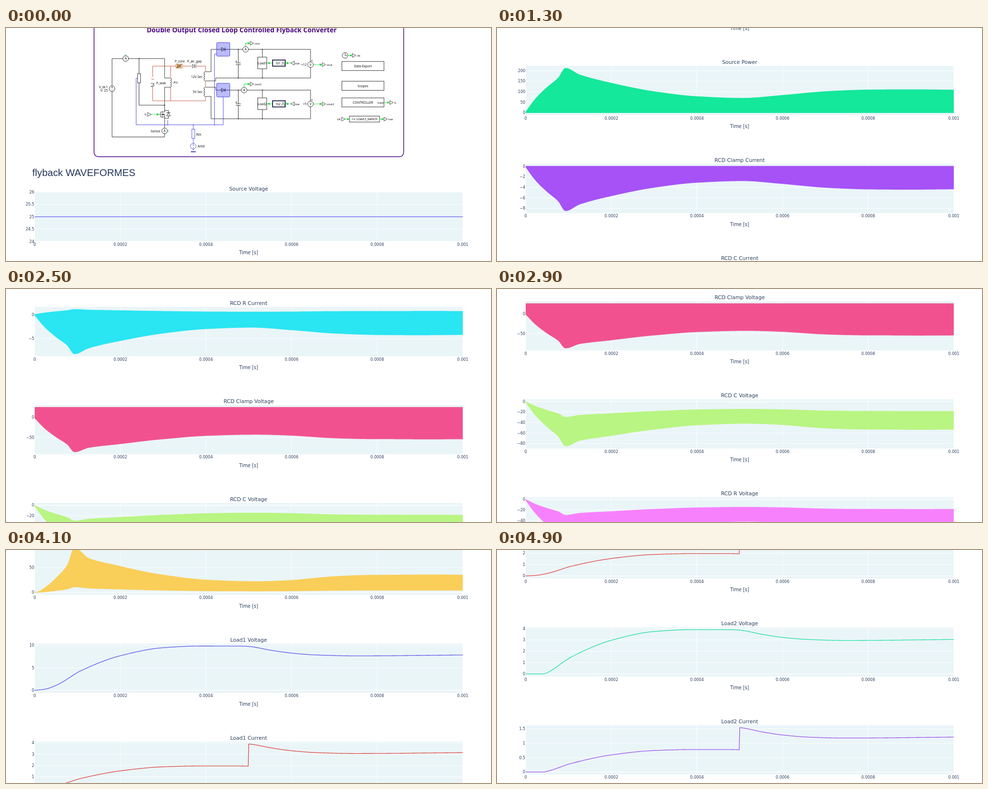
Recreate the animation shown at these times as an HTML page. Size 997 px wide and 480 px high, loop 5000 ms.

```html
<!DOCTYPE html>
<html lang="en">
<head>
<meta charset="utf-8">
<title>Flyback converter report</title>
<style>
html, body { margin: 0; width: 100%; height: 100%; overflow: hidden; background: #fff; }
svg { display: block; }
.plot text { font-family: "DejaVu Sans", Verdana, sans-serif; fill: #2a3f5f; }
.circuit text { font-family: "Noto Sans", "Open Sans", sans-serif; fill: #111; }
.circuit .head { font-weight: 700; font-size: 13.73px; fill: #4b0a82; }
.title { font-size: 10.67px; }
.axis { font-size: 9.65px; }
.tick { font-size: 8px; }
.h1 { font: 20.2px "Liberation Sans", Arial, sans-serif; fill: #22355a; }
</style>
</head>
<body>
<svg width="997" height="480" viewBox="0 0 997 480">
  <clipPath id="frame"><rect x="59" y="0" width="880" height="4000"/></clipPath>
  <g id="page"></g>
</svg>
<script>
const LOOP = 5000, STEP = 100;
const LEFT = 59, WIDTH = 880, TOP = 338.2, PITCH = 201.9, HEIGHT = 101.5;
const page = document.getElementById('page');

// Monotone cubic through a few [x, y] points
function curve(...pts) {
  const n = pts.length - 1;
  const slope = i => (pts[i + 1][1] - pts[i][1]) / (pts[i + 1][0] - pts[i][0]);
  const tangent = i => {
    if (i === 0) return slope(0);
    if (i === n) return slope(n - 1);
    const a = slope(i - 1), b = slope(i);
    return a * b <= 0 ? 0 : 2 * a * b / (a + b);
  };
  return x => {
    let i = 0;
    while (i < n - 1 && x > pts[i + 1][0]) i++;
    const [x0, y0] = pts[i], [x1, y1] = pts[i + 1];
    const h = x1 - x0, u = (x - x0) / h, v = 1 - u;
    return y0 * (1 + 2 * u) * v * v + tangent(i) * h * u * v * v
      + y1 * u * u * (3 - 2 * u) - tangent(i + 1) * h * u * u * v;
  };
}

// Circuit

const BLACK = '#222', BLUE = '#4646dc', RED = '#c0533f', GREEN = '#18d838';

const path = (d, color = BLACK, w = 0.9, fill = 'none', extra = '') =>
  `<path d="${d}" stroke="${color}" stroke-width="${w}" fill="${fill}" ${extra}/>`;
const box = (x, y, w, h, color = BLACK, sw = 0.9, fill = '#fff', r = 0) =>
  `<rect x="${x}" y="${y}" width="${w}" height="${h}" rx="${r}" stroke="${color}" stroke-width="${sw}" fill="${fill}"/>`;
const ring = (x, y, color = BLACK) =>
  `<circle cx="${x}" cy="${y}" r="5.8" stroke="${color}" stroke-width=".9" fill="#fff"/>`;
const dot = (x, y, color = BLACK) => `<circle cx="${x}" cy="${y}" r="1.1" fill="${color}"/>`;
const label = (x, y, s, size = 6.6, anchor = 'start') =>
  `<text x="${x}" y="${y}" font-size="${size}" text-anchor="${anchor}">${s}</text>`;
const meter = (x, y, s) => ring(x, y) + label(x, y + 2.4, s, 6.6, 'middle');
const tri = (x, y, dir = 1) => path(`M${x} ${y - 4}l${7 * dir} 4l${-7 * dir} 4z`, BLACK, 0.8, '#fff');
const signal = (x1, x2, y) => {
  const d = Math.sign(x2 - x1);
  return path(`M${x1} ${y}H${x2 - 4 * d}`, GREEN, 1, 'none', 'stroke-dasharray="2.5 .8"')
    + path(`M${x2} ${y}l${-5 * d} -2.3v4.6z`, GREEN, 0.3, GREEN);
};
const coil = (x, y, n, side) =>
  path(`M${x} ${y}` + `a2.4 2.4 0 0 ${side > 0 ? 1 : 0} 0 4.75`.repeat(n));
const source = (x, y, color) => ring(x, y, color)
  + path(`M${x - 1.5} ${y - 2.5}h3m-1.5 -1.5v3M${x - 1.5} ${y + 2.8}h3`, color, 0.7);

// One secondary side: rectifier, capacitor, load and meters
function output(y, n, ampX, voltY, volts, name) {
  return path(`M460 ${y}H626V${y + 59}M477.5 ${y}v28m0 3.5v27.5M527 ${y}v59`)
    + path(`M472.5 ${y + 28}h10m-10 3.5h10`) + path(`M471.5 ${y + 25}h3.6m-1.8 -1.8v3.6`, BLACK, 0.7)
    + [477.5, 527].map(x => dot(x, y) + dot(x, y + 59)).join('')
    + box(433, y - 14, 27, 28, BLUE, 1, '#bcbcfa', 2)
    + path(`M433 ${y}H460M443 ${y - 4}v8l7 -4zM450.5 ${y - 4}v8`, '#222255')
    + path(`M${ampX} ${y - 6}v-6.5H497`, GREEN, 1) + signal(496, 502, y - 12.5)
    + tri(502, y - 12.5) + label(511, y - 10.5, 'iout' + name, 5.8)
    + meter(ampX, y, 'A') + box(517.5, y + 16, 18.5, 24) + label(526.8, y + 31, 'Load' + n, 6.4, 'middle')
    + signal(548, 537, y + 28.3) + box(548, y + 22, 26, 12.6, '#10183a', 1.7)
    + label(555, y + 30.8, 'ts' + n) + path(`M566 ${y + 31}h2v-5h3v5h2`, BLACK, 0.7)
    + signal(586, 575, y + 28.3) + tri(592.5, y + 28.3, -1) + label(594, y + 30.5, 'tsw', 5.8)
    + label(618, voltY + 2.2, volts, 6.6, 'end') + meter(626, voltY, 'V')
    + path(`M627.5 ${voltY - 8.5}h3m-1.5 -1.5v3`, BLACK, 0.6)
    + signal(632, 650, voltY) + tri(650, voltY) + label(659, voltY + 2, 'vout' + name, 5.8);
}

function primary() {
  return path('M218 119V63H326V103H338M338 122H326V171M273.5 63V159H326M218 131V224.5H326V186')
    + dot(273.5, 63) + dot(326, 159)
    + source(218, 125, BLACK) + label(209, 124, 'V_dc1', 6.6, 'end') + label(209, 131, 'V: 25', 6.6, 'end')
    + meter(246, 63, 'A') + path('M244 56.5l1.5 -2l2 1.5', GREEN)
    + path('M301.5 101V78.5H410V90M410 141V150H301.5V121M338.5 78.5V102M338.5 122V150M410 109V122', RED)
    + path('M298.5 104q3 4 6 0', RED, 1) + path('M297.5 114h7M298 121l6 -6v5z', BLACK, 0.8)
    + box(349, 74, 13.5, 9, '#c98a50', 0.6, '#ecc08a') + path('M350 82l11 -7M353 75v7l4 -3.5zM358 75v7', BLACK, 0.7)
    + box(381, 74, 10, 9, '#fff', 0) + path('M383 74.5v8l4 -4zM387.5 74.5v8M390 74.5v8', BLACK, 0.8)
    + label(347, 71, 'P_core') + label(372.5, 71, 'P_air_gap') + label(309, 115.5, 'P_leak') + label(344.5, 115, 'Pri')
    + coil(338, 103, 4, 1) + coil(409, 90, 4, -1) + coil(409, 122, 4, -1)
    + label(404, 103, '12V Sec', 6.6, 'end') + label(404, 134, '5V Sec', 6.6, 'end')
    + path('M410 90H421.5V44H433M410 109H431V103H626M410 122H431V128H433M410 141H421.5V187H626');
}

function thermal() {
  return path('M270.5 103.5H267.5V199.5H446.5V142M428.5 199.5V53.5H433M332.5 190V199.5M385 199.5V252', BLUE)
    + [332.5, 385, 428.5].map(x => dot(x, 199.5, BLUE)).join('')
    + box(382, 208.5, 6, 19, BLUE)
    + source(385, 243.5, BLUE) + path('M380 255H390', BLUE, 2)
    + label(391, 221.5, 'Rth') + label(394, 246.3, 'Amb');
}

function power() {
  return label(284.5, 180.3, 'G', 5.8) + tri(291, 178) + signal(298, 315, 178)
    + path('M315 178h3M318 172.5V184M320.8 171v4m0 1.5v3.5m0 1.5v4M321 173H326V170H334V186H326V183H321M321 178H326V183')
    + path('M330 181h8l-4 -6.5zM330 174.5h8', BLACK, 0.9, '#fff')
    + path('M325.5 178l-3.5 -1.7v3.4z', BLACK, 0.3, BLACK)
    + label(317, 214.5, 'Isense', 6.4, 'end') + meter(326, 212, 'A') + path('M332.5 210.5l2 1.5l-2 1.5', GREEN);
}

function controls() {
  const block = (y, s) => box(690.5, y, 86.5, 18.7) + label(733.7, y + 11.8, s, 6.6, 'middle');
  return ring(697, 56.5) + path('M697 52V56.5H701', BLACK, 0.8) + signal(703, 712, 56.5) + tri(712, 56.5)
    + label(721, 58.5, 'clk', 5.8) + block(69, 'Data Export') + block(109.7, 'Scopes') + block(144, 'CONTROLLER')
    + label(763.5, 155.5, 'Gate', 5.8) + signal(777, 789, 153.5) + tri(789, 153.5) + label(798, 155.8, 'G', 5.8)
    + label(680.5, 189.5, 'clk', 5.8) + tri(690, 187.7) + signal(697, 706, 187.7)
    + box(706, 181.5, 62, 12.3) + label(737, 190.2, '&gt;= Load.t_switch', 6.8, 'middle')
    + signal(768, 777, 187.7) + tri(777, 187.7) + label(786, 189.7, 'tsw', 5.8);
}

const circuit = () => `<g class="circuit">`
  + box(181, -40, 636.5, 305.3, '#4b0a82', 1.5, '#fff', 9)
  + `<text class="head" x="484.5" y="9.2" text-anchor="middle">Double Output Closed Loop Controlled Flyback Converter</text>`
  + thermal() + primary() + box(270.5, 94, 6, 19) + power()
  + output(44, 1, 492.5, 75.5, '+12', '') + output(128, 2, 489.5, 156.5, '+5', '2')
  + controls() + '</g>';

// Signals, as functions of the horizontal position

const peak = curve([59, 0.1], [80, 2.7], [103, 4.8], [126, 6.6], [141, 8.45], [170, 7.2], [235, 5.61],
  [323, 4], [411, 3.06], [505, 2.74], [587, 3.29], [675, 4.01], [763, 4.33], [850, 4.38], [939, 4.31]);
const share = curve([59, 0.124], [141, 0.125], [235, 0.144], [411, 0.182], [500, 0.19],
  [587, 0.167], [675, 0.157], [800, 0.151], [939, 0.153]);
const clamp = x => peak(x) * share(x);
const load1 = curve([59, 0], [80, 0.26], [103, 1.1], [155, 4.4], [235, 7.67], [323, 9.45], [400, 9.83],
  [480, 9.82], [499, 9.73], [545, 8.88], [587, 8.26], [640, 7.83], [719, 7.64], [939, 7.84]);
const load2 = x => Math.max(0, 0.434 * load1(x) - 0.365);
const flat = v => () => v;
const scaled = (f, k) => x => f(x) * k;
// The load resistance halves midway
const current = f => x => f(x) * (x < 499 ? 0.2 : 0.4);
const watts = k => x => k * clamp(x) ** 2;

// title, colour, tick step, upper edge, lower edge (none: a line)
const charts = [
  ['Source Voltage', '#5f58e8', 0.5, flat(25)],
  ['Source Current', '#e3473f', 2, peak, flat(0)],
  ['Source Power', '#14e89a', 50, scaled(peak, 25), flat(0)],
  ['RCD Clamp Current', '#a652f6', 2, flat(0), scaled(peak, -1)],
  ['RCD C Current', '#f79d5c', 0.5, scaled(clamp, -0.36), scaled(clamp, -1)],
  ['RCD R Current', '#2ae5f2', 5, clamp, scaled(peak, -0.96)],
  ['RCD Clamp Voltage', '#f1528f', 50, flat(25), scaled(clamp, -81.4)],
  ['RCD C Voltage', '#b9f582', 20, scaled(clamp, -28.5), scaled(clamp, -80.2)],
  ['RCD R Voltage', '#f781fd', 20, scaled(clamp, -28.5), scaled(clamp, -80.2)],
  ['RCD Clamp Power', '#f9ce59', 50, watts(80.2), watts(10)],
  ['Load1 Voltage', '#5f5ae8', 5, load1],
  ['Load1 Current', '#dd4a45', 1, current(load1)],
  ['Load2 Voltage', '#1fe0a0', 1, load2],
  ['Load2 Current', '#a055ee', 0.5, current(load2)]
];

const xs = Array.from({ length: WIDTH + 1 }, (_, i) => LEFT + i);

// Axis range: the data with 1/18 of its span on either side
function range(upper, lower = upper) {
  const hi = Math.max(...xs.map(upper)), lo = Math.min(...xs.map(lower));
  const pad = hi > lo ? (hi - lo) / 18 : 1;
  return [lo - pad, hi + pad];
}

function plot([title, color, step, upper, lower], index) {
  const top = TOP + index * PITCH, bottom = top + HEIGHT;
  const [lo, hi] = range(upper, lower);
  const toY = v => bottom - HEIGHT * (v - lo) / (hi - lo);
  const trace = (f, list) => list.map(x => `${x} ${toY(f(x)).toFixed(2)}`).join('L');
  const text = (cls, x, y, s, anchor = 'middle') =>
    `<text class="${cls}" x="${x}" y="${y}" text-anchor="${anchor}">${s}</text>`;
  let out = `<rect x="${LEFT}" y="${top}" width="${WIDTH}" height="${HEIGHT}" fill="#eaf5f8"/>`;
  for (let i = 0; i <= 5; i++) {
    const x = LEFT + i * WIDTH / 5;
    out += path(`M${x} ${top}V${bottom}`, '#fff');
    out += text('tick', x, bottom + 9, i === 5 ? '0.001' : i ? '0.000' + 2 * i : '0');
  }
  for (let k = Math.ceil(lo / step); k * step <= hi; k++) {
    const y = toY(k * step);
    out += path(`M${LEFT} ${y}H${LEFT + WIDTH}`, '#fff', k ? 0.9 : 1.33);
    out += text('tick', 58.2, y + 2.9, String(k * step).replace('-', '−'), 'end');
  }
  const shape = lower ? `M${trace(upper, xs)}L${trace(lower, xs.slice().reverse())}Z` : `M${trace(upper, xs)}`;
  out += path(shape, color, 1.33, lower ? color : 'none', 'clip-path="url(#frame)"');
  out += text('title', 498.8, top - 3.7, title) + text('axis', 498.8, bottom + 26.7, 'Time [s]');
  return `<g class="plot">${out}</g>`;
}

page.innerHTML = circuit() + '<text class="h1" x="54" y="304.8">flyback WAVEFORMES</text>' + charts.map(plot).join('');

const scroll = curve([0, 0], [800, 410], [1300, 664], [2000, 1042.5], [2900, 1524.5], [4100, 2164.5], [4900, 2602]);

function draw(now) {
  const t = Math.floor(now % LOOP / STEP) * STEP;
  page.setAttribute('transform', `translate(0 ${-scroll(t)})`);
  requestAnimationFrame(draw);
}
draw(0);
</script>
</body>
</html>
```
